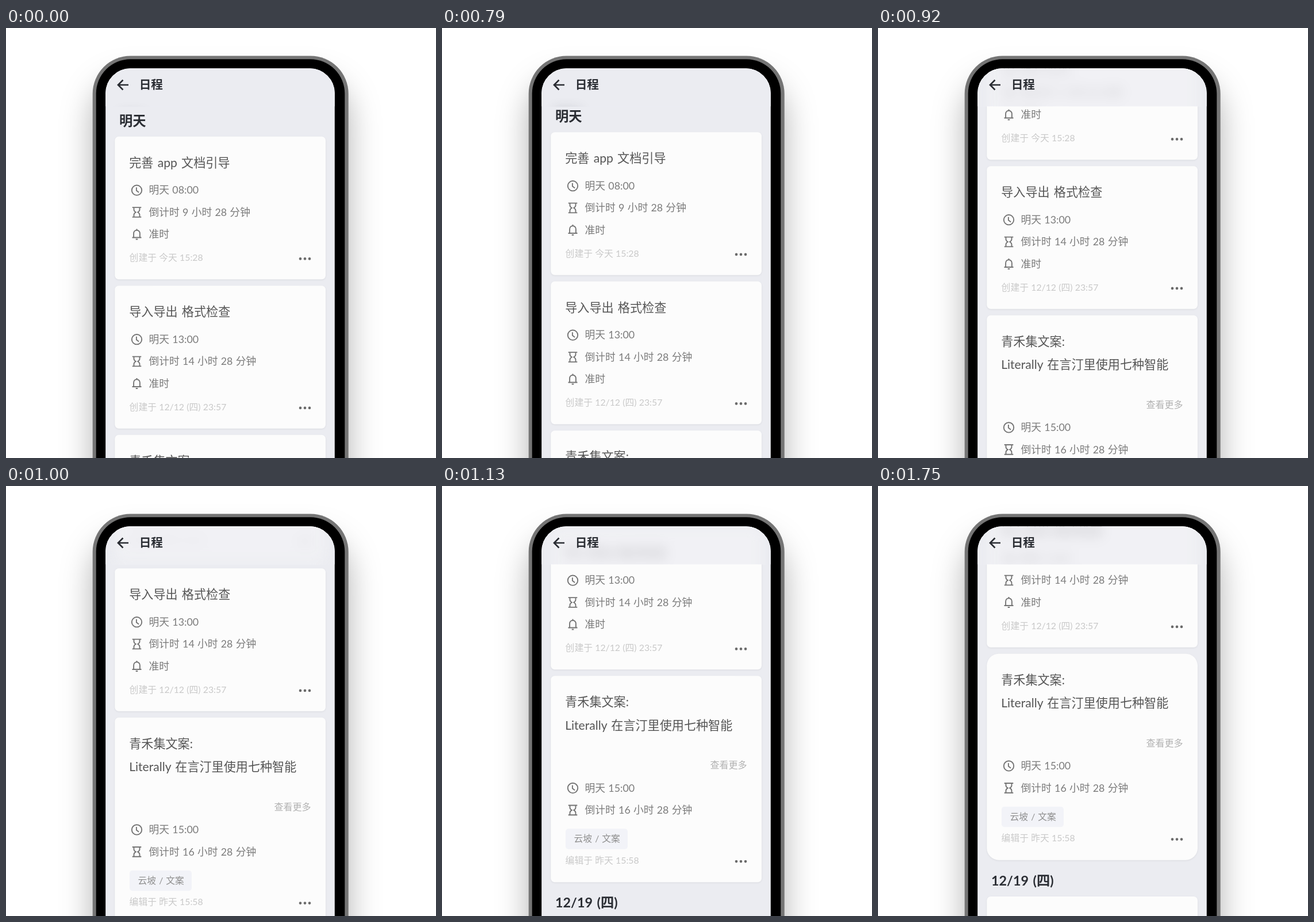
Animation, 748 px wide and 748 px high, one loop 1.91 s. Source, as an HTML page:

```html
<!DOCTYPE html>
<html lang="zh-CN">
<head>
<meta charset="utf-8">
<title>日程</title>
<style>
  html, body { margin: 0; width: 100%; height: 100%; overflow: hidden; background: #fff; }
  svg { display: block; width: 748px; height: 748px; overflow: hidden; }
  text { font-family: Lato, "Noto Sans CJK SC", "Noto Sans CJK", sans-serif; }
  .frame { fill: #757575; filter: drop-shadow(0 42px 27px rgba(0, 0, 0, .3)); }
  .screen { fill: #ebecf1; }
  .blurred { filter: blur(11px); opacity: .35; }
  .head { font-size: 20.6px; font-weight: 700; fill: #2a2d33; }
  .day { font-size: 23.3px; font-weight: 700; fill: #2a2d33; word-spacing: 2px; }
  .title { font-size: 21.1px; fill: #555; word-spacing: 1.9px; }
  .meta { font-size: 17.8px; fill: #7b7b7b; word-spacing: .7px; }
  .foot { font-size: 15.8px; fill: #c9c9c9; word-spacing: .2px; }
  .more { font-size: 16px; fill: #b2b2b2; }
  .tag { font-size: 15.8px; fill: #8f8f8f; word-spacing: 1px; }
  .card { fill: #fcfcfc; filter: drop-shadow(0 1px 1.5px rgba(0, 0, 0, .07)); }
  .icon { fill: none; stroke: #747474; stroke-width: 1.9; }
  .dots { fill: #6a6a6a; }
</style>
</head>
<body>
<svg viewBox="0 0 748 748">
  <clipPath id="glassEdge"><rect x="173.2" y="70.3" width="398.6" height="760" rx="43"/></clipPath>
  <clipPath id="headerEdge"><rect x="173" y="70" width="399" height="66.3"/></clipPath>
  <rect class="frame" x="150.7" y="48.5" width="445" height="800" rx="66"/>
  <rect x="156.7" y="54.3" width="432.6" height="800" rx="60"/>
  <g clip-path="url(#glassEdge)">
    <rect class="screen" x="173" y="70" width="399" height="678"/>
    <g id="list"></g>
    <g clip-path="url(#headerEdge)">
      <rect class="screen" x="173" y="70" width="399" height="67"/>
      <g class="blurred"><use href="#list"/></g>
    </g>
    <path d="M213 99H196M203.5 90.5L195 99l8.5 8.5" fill="none" stroke="#2a2d33" stroke-width="2.7"/>
    <text class="head" x="231.7" y="106">日程</text>
  </g>
</svg>
<script>
const LOOP = 1910, FPS = 24;
const list = document.getElementById('list');

const icons = {
  clock: '<circle r="8.7"/><path d="M-.6-5V.6L3.6 3.8"/>',
  glass: '<path d="M-7.8-8.4H7.8M-7.8 8.4H7.8M-5-8V-4.5Q-5-2-1.8 0Q-5 2-5 4.5V8M5-8V-4.5Q5-2 1.8 0Q5 2 5 4.5V8"/>',
  bell: '<path d="M-8 5.6H8M-5.4 5.6V-1.5C-5.4-9 5.4-9 5.4-1.5V5.6M0-9.5V-7M-1.8 8.6H1.8"/>'
};

// y is the middle of the line of text
const text = (kind, x, y, size, words) =>
  `<text class="${kind}" x="${x}" y="${y + size * .38}">${words}</text>`;
const title = (y, words) => text('title', 214.2, y, 21.1, words);
const day = (y, words) => text('day', 197, y, 23.3, words);
const row = (icon, y, words) =>
  `<g class="icon" transform="translate(227.5 ${y + .5})">${icons[icon]}</g>` + text('meta', 248.5, y, 17.8, words);
const foot = (y, words) => text('foot', 214.6, y, 15.8, words) +
  [512, 520, 528].map(x => `<circle class="dots" cx="${x}" cy="${y + 2.2}" r="2.3"/>`).join('');
const card = (y, height, body = '') =>
  `<g transform="translate(0 ${y})"><rect class="card" x="189.3" width="366.7" height="${height}" rx="7"/>${body}</g>`;

const task = (name, when, left, made) =>
  title(45, name) + row('clock', 93, when) + row('glass', 131.3, left) + row('bell', 169.7, '准时') + foot(210.5, made);

list.innerHTML =
  day(161, '明天') +
  card(188.7, 248.5, task('完善 app 文档引导', '明天 08:00', '倒计时 9 小时 28 分钟', '创建于 今天 15:28')) +
  card(448.2, 248.5, task('导入导出 格式检查', '明天 13:00', '倒计时 14 小时 28 分钟', '创建于 12/12 (四) 23:57')) +
  card(707.7, 359,
    title(45, '青禾集文案:') + title(85.5, 'Literally 在言汀里使用七种智能') +
    text('more', 466.5, 155, 16, '查看更多') +
    row('clock', 194.7, '明天 15:00') + row('glass', 233.2, '倒计时 16 小时 28 分钟') +
    '<rect x="215" y="266" width="108" height="35.5" rx="5" fill="#f2f3f8"/>' +
    text('tag', 229.5, 283, 15.8, '云坡 / 文案') +
    foot(320.7, '编辑于 昨天 15:58')) +
  day(1102, '12/19 (四)') +
  card(1130, 300);

const pressed = list.querySelectorAll('.card')[2];

// Scroll offsets per step of the swipe and of the later slow glide
const swipe = [0, 7.5, 64, 138, 208, 261, 305, 339, 363, 377.5];
const glide = [377.5, 395, 402, 407, 411, 414, 415.5, 416];
const at = (steps, i) => steps[Math.max(0, Math.min(i, steps.length - 1))];

function draw(now) {
  const step = Math.floor((now % LOOP + 5) * FPS / 1000);
  const scroll = step < 35 ? at(swipe, step - 18) : at(glide, step - 34);
  const press = Math.max(0, Math.min((step - 35) / 7, 1));
  list.setAttribute('transform', `translate(0 ${-scroll})`);
  pressed.setAttribute('rx', 7 + 14 * press);
}

const start = performance.now();
function tick() {
  draw(performance.now() - start);
  requestAnimationFrame(tick);
}
tick();
</script>
</body>
</html>
```
